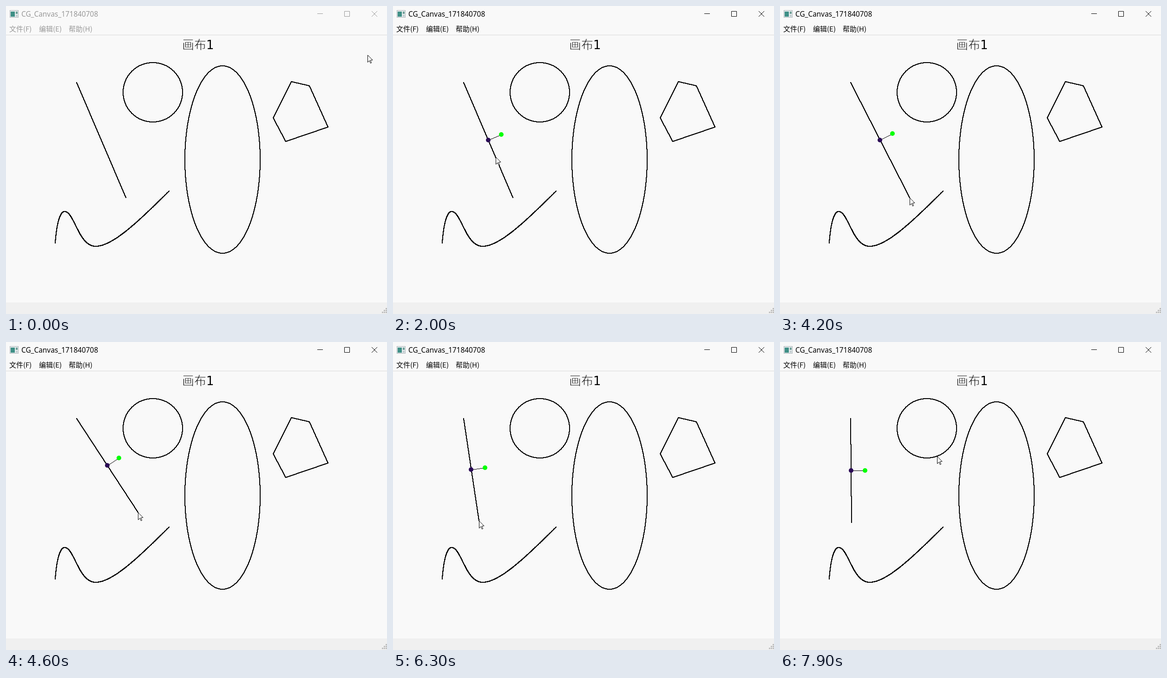
An HTML page with a canvas that plays this animation: 820x664 px, repeating every 8 s.

```html
<!DOCTYPE html>
<html lang="zh-CN">
<head>
<meta charset="utf-8">
<title>CG_Canvas</title>
<style>
  html, body { margin: 0; width: 100%; height: 100%; overflow: hidden; background: #f9f9f9; }
  canvas, svg { position: absolute; left: 0; top: 0; width: 820px; height: 664px; }
  .chrome { --ink: #999; }
  .chrome.active { --ink: #000; }
  .chrome text { fill: var(--ink); font: 15px "Noto Sans CJK SC", "Noto Sans CJK JP", "Noto Sans CJK", sans-serif; }
  .chrome .name { font: 15.4px "Noto Sans", "Open Sans", sans-serif; }
  .chrome path { fill: none; stroke: var(--ink); }
  /* a thin outline in the background colour makes the strokes slimmer */
  .label { font: 100 26px "Noto Sans CJK SC", "Noto Sans CJK JP", "Noto Sans CJK", sans-serif; stroke: #f9f9f9; stroke-width: .8; }
  .digit { font: 26px "DejaVu Sans", sans-serif; }
</style>
</head>
<body>
<canvas id="stage" width="820" height="664"></canvas>
<svg viewBox="0 0 820 664">
  <rect y="62" width="820" height="1" fill="#d9d9d9"/>
  <rect y="639" width="820" height="25" fill="#f0f0f0"/>
  <path fill="#bdbdbd" d="M817 651h3v3h-3zM813 655h3v3h-3zM817 655h3v3h-3zM809 659h3v3h-3zM813 659h3v3h-3zM817 659h3v3h-3z"/>

  <!-- window icon -->
  <rect x="8.5" y="9.5" width="18" height="15" fill="#e9eef0" stroke="#a9b1b5"/>
  <rect x="10" y="12" width="9" height="11" fill="#3f8f86"/>
  <rect x="21" y="12" width="4" height="5" fill="#6f9f97"/>
  <rect x="21" y="19" width="4" height="4" fill="#c3cdd0"/>

  <g class="chrome" id="chrome">
    <text class="name" x="33" y="23">CG_Canvas_171840708</text>
    <text x="7" y="55">文件(F)</text>
    <text x="71" y="55">编辑(E)</text>
    <text x="135" y="55">帮助(H)</text>
    <path d="M670 16.5h12M728.5 11.5h11v11h-11zM787 11l12 12M799 11l-12 12"/>
  </g>

  <text class="label" x="379" y="93">画布</text>
  <text class="digit" x="431" y="93">1</text>

  <path id="cursor" fill="#fff" stroke="#000" d="M.5 .9V16.3L4.1 12.8L6.5 18.4L8.6 17.4L6.2 12L11 11.5Z"/>
</svg>
<script>
  const LOOP = 8000, STEP = 100, ARM = 30;
  const FOCUS = 2000, GRAB = 4000;
  const pivot = [152, 165], rest = [258, 413], home = [778, 105];

  // pointer moves: start, end, points passed on the way
  const moves = [
    [0, 200, [392, 379]],
    [300, 1500, [221, 325]],
    [2300, 3200, [262, 240], [278, 330], [249, 415]],
    [3200, 3300, [250, 404]],
    [3300, 3700, [255, 412]],
    [3900, 4600, [268, 422], [306, 380], [284, 367]],
    [4600, 5300, [200, 388], [132, 396], [128, 395]],
    [5300, 5500, [131, 398]],
    [5900, 6300, [185, 385]],
    [6600, 6800, [154, 389]],
    [7100, 7900, [352, 235], [338, 246]]
  ];
  const DROP = 6800;

  const chrome = document.getElementById("chrome");
  const cursor = document.getElementById("cursor");
  const ctx = document.getElementById("stage").getContext("2d");

  // smooth curve through points, u from 0 to 1; a single stretch slows down
  function along(points, u) {
    const n = points.length - 1;
    const s = n === 1 ? u * (2 - u) : u * n;
    const i = Math.min(Math.floor(s), n - 1), f = s - i;
    const at = k => points[Math.max(0, Math.min(n, k))];
    return [0, 1].map(d => {
      const [a, b, c, e] = [i - 1, i, i + 1, i + 2].map(k => at(k)[d]);
      return b + f * ((c - a) + f * (2 * a - 5 * b + 4 * c - e + f * (3 * (b - c) + e - a))) / 2;
    });
  }

  function pointer(t) {
    let i = moves.length - 1;
    while (moves[i][0] > t) i--;
    const [start, end, ...points] = moves[i];
    const from = i ? moves[i - 1].at(-1) : home;
    const u = Math.min(1, (t - start) / (end - start));
    return along([from, ...points], u).map(Math.round);
  }

  // square pen without antialiasing
  function plot(x, y, size = 2) {
    const shift = size >> 1;
    ctx.fillRect(Math.round(x) - shift, Math.round(y) - shift, size, size);
  }

  function line([x0, y0], [x1, y1], size) {
    const n = Math.max(Math.abs(x1 - x0), Math.abs(y1 - y0));
    for (let i = 0; i <= n; i++) plot(x0 + (x1 - x0) * i / n, y0 + (y1 - y0) * i / n, size);
  }

  function ellipse(cx, cy, rx, ry) {
    const half = (r, q, v) => r * Math.sqrt(1 - v * v / (q * q));
    for (const side of [-1, 1]) {
      for (let x = -rx; x <= rx; x++) plot(cx + x, cy + side * half(ry, rx, x));
      for (let y = -ry; y <= ry; y++) plot(cx + side * half(rx, ry, y), cy + y);
    }
  }

  function bezier(a, b, c, d, n = 400) {
    for (let i = 0; i <= n; i++) {
      const t = i / n, s = 1 - t;
      const mix = k => s * s * s * a[k] + 3 * s * s * t * b[k] + 3 * s * t * t * c[k] + t * t * t * d[k];
      plot(mix(0), mix(1));
    }
  }

  function dot([x, y], color) {
    ctx.fillStyle = color;
    ctx.beginPath();
    ctx.arc(x, y, 5, 0, 2 * Math.PI);
    ctx.fill();
  }

  function shapes() {
    ellipse(316, 186, 64, 64);
    ellipse(466, 331, 81, 202);
    const corners = [[614, 163], [653, 172], [693, 261], [602, 292], [575, 241]];
    corners.forEach((p, i) => line(p, corners[(i + 1) % corners.length]));
    const crest = [126, 443], dip = [193, 518];
    bezier([106, 511], [109, 466], [117, 443], crest);
    bezier(crest, [147, 443], [156, 518], dip);
    bezier(dip, [231, 518], [290, 459], [351, 399]);
  }

  // hub in the middle of the line, knob always on its upper side
  function gizmo(end) {
    const dx = end[0] - pivot[0], dy = end[1] - pivot[1];
    const k = (dx < 0 ? -ARM : ARM) / Math.hypot(dx, dy);
    const hub = [0, 1].map(d => Math.floor((pivot[d] + end[d]) / 2));
    const knob = [hub[0] + dy * k, hub[1] - dx * k].map(Math.round);
    line(hub, knob, 1);
    dot(hub, "#2a0a55");
    dot(knob, "#0f0");
  }

  function draw(t) {
    const active = t >= FOCUS;
    chrome.classList.toggle("active", active);
    cursor.setAttribute("transform", `translate(${pointer(t)})`);

    const end = t < GRAB ? rest : pointer(Math.min(t, DROP));
    ctx.clearRect(0, 0, 820, 664);
    ctx.fillStyle = "#000";
    shapes();
    line(pivot, end);
    if (active) gizmo(end);
  }

  function tick() {
    draw(Math.floor(performance.now() % LOOP / STEP) * STEP);
    requestAnimationFrame(tick);
  }
  tick();
</script>
</body>
</html>
```
